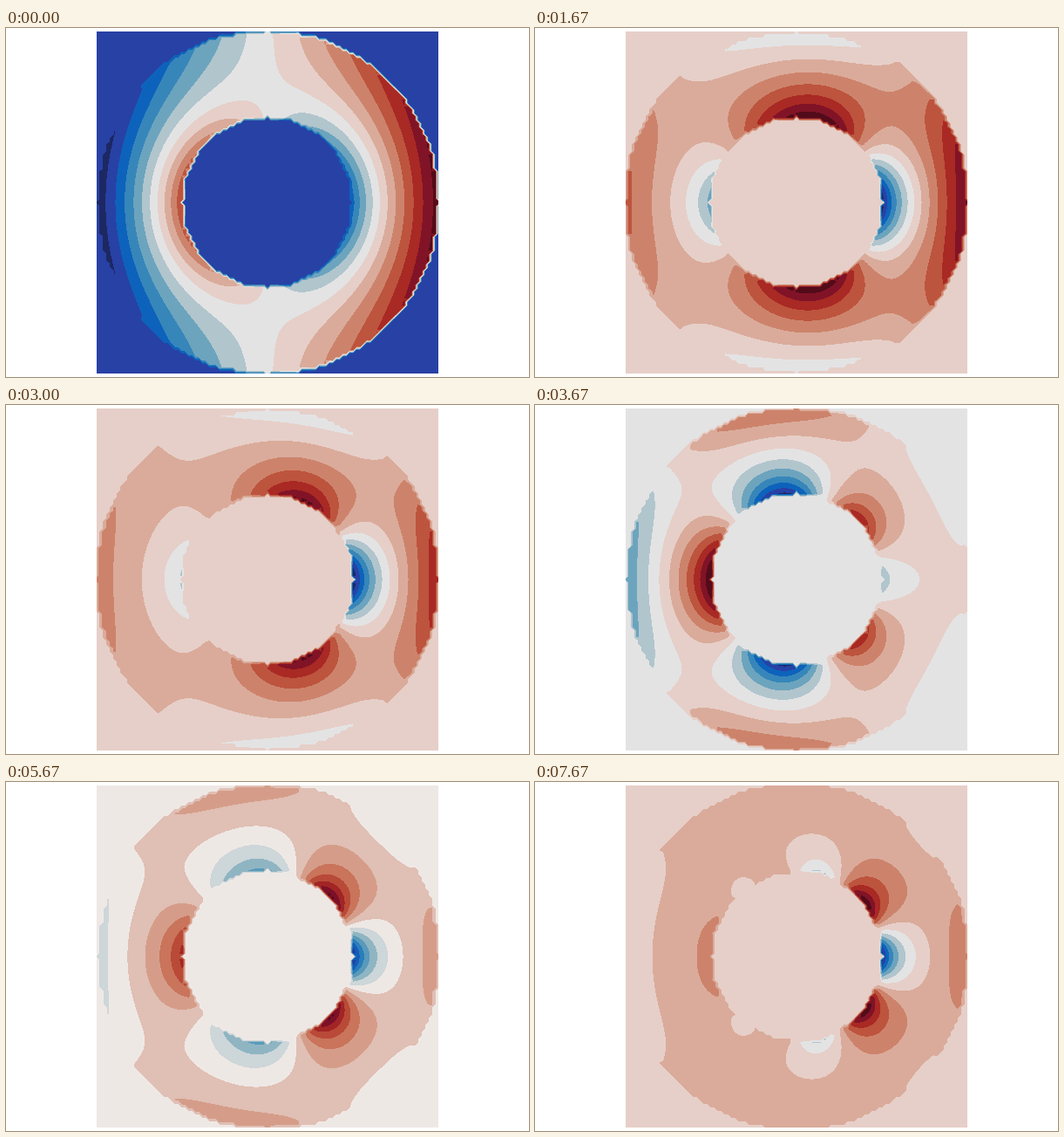
Animation of 600 by 400 pixels, one loop 8 s. Source, as a matplotlib script:

```python
import numpy as np
import matplotlib.pyplot as plt
from matplotlib.animation import FuncAnimation
from matplotlib.colors import LinearSegmentedColormap

FRAMES, LOOP_MS = 24, 8000
R_IN, R_OUT = 1.0, 2.0
SPAN = 13.4  # contour steps between the lowest and highest value
FLIP_FRAME = 10  # the second harmonic changes sign here

BALANCE = LinearSegmentedColormap.from_list("balance", [
    (0, "#171c42"), (.107, "#2841a6"), (.182, "#0b66bd"), (.273, "#4590b9"),
    (.364, "#8eb5c2"), (.393, "#b2c5cd"), (.464, "#e4e4e4"), (.5, "#eee9e7"),
    (.536, "#e6d0c9"), (.636, "#d59d89"), (.727, "#c46549"),
    (.818, "#ac2b24"), (.909, "#780e28"), (1, "#3c0911")])

# Harmonic: (peak strength, frame of the peak, width in frames)
PULSES = {2: (5.8, 5, 10), 3: (4.1, 14, 9), 4: (2.7, 18, 12),
          5: (2.8, 23, 8), 6: (1.7, 26, 8)}

axis = np.linspace(-R_OUT, R_OUT, 101)
X, Y = np.meshgrid(axis, axis)
R, THETA = np.hypot(X, Y), np.arctan2(Y, X)
RING = (R > R_IN + 1e-9) & (R <= R_OUT + 1e-9)
r, theta = R[RING], THETA[RING]


def radial(n):
    """Harmonic profile: 1 on the inner edge, reversed and weaker on the outer."""
    outer = -1.66 * n ** -1.7
    rise = (outer - R_OUT ** -n) / (R_OUT ** n - R_OUT ** -n)
    return rise * r ** n + (1 - rise) * r ** -n


MODES = {n: radial(n) * np.cos(n * theta) for n in range(1, 7)}


def strengths(frame):
    """The first harmonic fades while higher ones swell in turn."""
    fade = np.exp(-frame / 2)
    result = {1: -.3 - 3.8 * fade}
    for n, (peak, center, width) in PULSES.items():
        result[n] = -peak * (1 - fade) * np.exp(-((frame - center) / width) ** 2)
    if frame >= FLIP_FRAME:
        result[2] *= -1
    return result


def field(frame):
    total = .35 + 4.5 * np.exp(-frame / 2)
    for n, strength in strengths(frame).items():
        total = total + strength * MODES[n]
    z = np.zeros_like(R)
    z[RING] = total * SPAN / np.ptp(total)
    return z


fig = plt.figure(figsize=(6, 4), dpi=100, facecolor="white")
ax = fig.add_axes([104 / 600, 4 / 400, 392 / 600, 392 / 400])


def draw(frame):
    ax.clear()
    ax.set_axis_off()
    z = field(frame)
    levels = np.arange(np.floor(z.min()), np.ceil(z.max()) + 1)
    ax.contourf(X, Y, z, levels=levels, cmap=BALANCE)
    ax.set(xlim=(-R_OUT, R_OUT), ylim=(-R_OUT, R_OUT))
    return []


anim = FuncAnimation(fig, draw, frames=FRAMES, init_func=lambda: [],
                     interval=LOOP_MS / FRAMES, repeat=True, repeat_delay=0)
plt.show()
```
